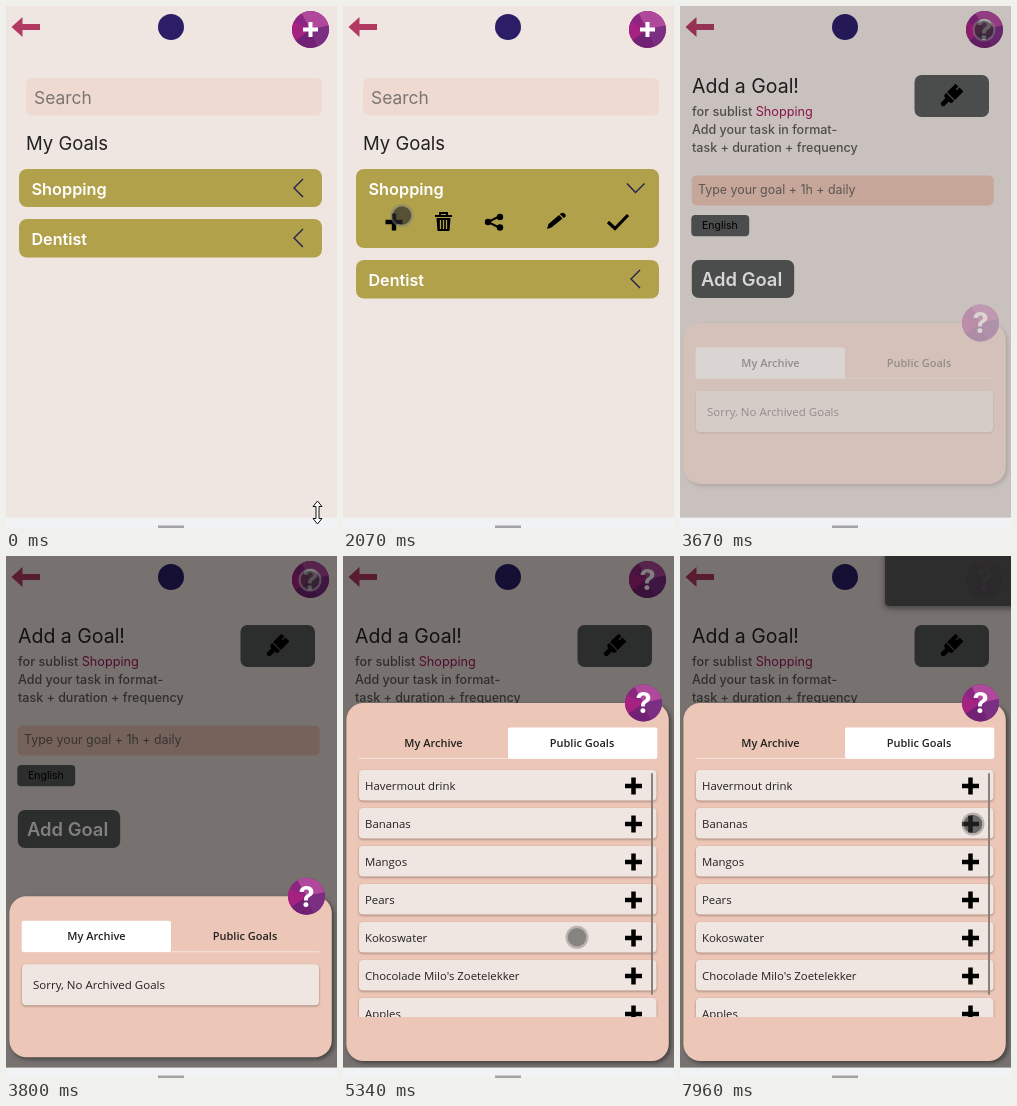
These frames come from a looping animation (331x522 px, 8 s). An HTML page:

```html
<!DOCTYPE html>
<html lang="en">
<head>
<meta charset="utf-8">
<title>Goals</title>
<style>
html, body { margin: 0; width: 100%; height: 100%; overflow: hidden; background: #efe6e1; }
svg { display: block; width: 331px; height: 522px; }
text { font-family: Inter, sans-serif; fill: #222; white-space: pre; }
.modal text { font-family: "Open Sans", sans-serif; }
.modal .tab { font-weight: 600; text-anchor: middle; }
text.mark { font-family: Inter, sans-serif; font-weight: 700; fill: #fff; text-anchor: middle; }
.line { fill: none; stroke: #22204f; stroke-width: 1.4; }
.card { fill: #b1a14a; }
.note { fill: #595b5a; }
.row { fill: #efe6e1; filter: drop-shadow(0 1.5px 1px rgba(90, 60, 50, .5)); }
</style>
</head>
<body>
<svg id="stage" viewBox="0 0 331 522"></svg>
<script>
const LOOP = 8000;
const stage = document.getElementById('stage');

const rect = (x, y, w, h, r, attr = '') =>
  `<rect x="${x}" y="${y}" width="${w}" height="${h}" rx="${r}" ${attr}/>`;
const text = (x, y, size, str, attr = '') =>
  `<text x="${x}" y="${y}" font-size="${size}" ${attr}>${str}</text>`;
const group = (id, body, attr = '') => `<g id="${id}" ${attr}>${body}</g>`;
const plus = (x, y, r, w) =>
  `<path d="M${x - r} ${y}h${2 * r}M${x} ${y - r}v${2 * r}" stroke="#000" stroke-width="${w}"/>`;

// Round faceted button centred on 0,0
const badge = `<circle r="18.5" fill="#8d2682"/>
  <path d="M0 0L-9 -16.2A18.5 18.5 0 0 1 18 -4Z" fill="#b0489b"/>
  <path d="M0 0L18 -4A18.5 18.5 0 0 1 7 17.1Z" fill="#7b2f83"/>
  <path d="M0 0L7 17.1A18.5 18.5 0 0 1 -15 10.8Z" fill="#722274"/>
  <path d="M0 0L-15 10.8A18.5 18.5 0 0 1 -17 -7.2Z" fill="#a52280"/>`;
const help = badge + text(0, 10.3, 29, '?', 'class="mark"');
const add = badge + '<path d="M-7.5 0h15M0 -7.5v15" stroke="#fff" stroke-width="4"/>';

const header = `<path d="M5.5 21L16.5 11V18H34V24H16.5V31Z" fill="#b23a62"/>
  <circle cx="165" cy="21" r="13" fill="#2b1e66"/>`;

const actions = plus(51, 216, 8.5, 4.4) +
  `<path d="M92 210h17M97 209v-2h7v2" fill="none" stroke="#000" stroke-width="2"/>
  <path d="M93.5 212h14l-1 13h-12Z"/>
  <path d="M97.5 214v9M100.5 214v9M103.5 214v9" stroke="#b1a14a" stroke-width="1.3"/>
  <path d="M157 210L145 216L157 222" fill="none" stroke="#000" stroke-width="2"/>
  <circle cx="145" cy="216" r="3.2"/><circle cx="157" cy="211" r="3.2"/><circle cx="157" cy="221.5" r="3.2"/>
  <path d="M204 223l1.5 -5L216 209l3.5 3.5L208.5 221.5Z"/>
  <path d="M216.8 208.3l2 -1.5q4 0 4 3.5l-2 1.7Z"/>
  <path d="M265 216l7 6.5L285 209" fill="none" stroke="#000" stroke-width="3.2"/>`;

const label = 'style="fill:#fff" font-weight="600"';
const home = rect(20, 72, 296, 37.5, 6, 'fill="#eedad0"') +
  text(28, 97.5, 17.4, 'Search', 'style="fill:#7a7573"') +
  text(20, 143.5, 18.5, 'My Goals') +
  rect(13, 163, 303, 38, 8, 'id="card" class="card"') +
  text(25.5, 188.5, 16.3, 'Shopping', label) +
  '<path id="closed" class="line" d="M297 173L288 182L297 191"/>' +
  group('open', '<path class="line" d="M284 177.5L292.5 186.5L301.5 177.5"/>' + actions) +
  group('next', rect(13, 213, 303, 38.5, 8, 'class="card"') +
    text(25.5, 238.5, 16.1, 'Dentist', label) +
    '<path class="line" d="M297 223L288 232L297 241"/>');

const soft = 'style="fill:#5f5b5a" font-weight="500"';
const brush = `<g transform="translate(271 90) rotate(45)">
    <path d="M-5.5 -12h4v4h1.5v-4h5.5V0h-11Z"/>
    <path d="M-5.5 1.2h11v2q0 2.3 -2.5 2.3h-.6V12q-2.4 3 -4.8 0V5.5H-3q-2.5 0 -2.5 -2.3Z"/>
  </g>`;
const form = text(12, 87, 19.5, 'Add a Goal!') +
  text(12, 110, 12.7, 'for sublist <tspan fill="#a3195b" font-weight="400">Shopping</tspan>', soft) +
  text(12, 128, 12.5, 'Add your task in format-', soft) +
  text(12, 146, 12.5, 'task + duration + frequency', soft) +
  rect(234.5, 69, 74.5, 42, 7, 'class="note"') + brush +
  rect(11.7, 169.5, 302, 30, 5, 'id="input" fill="#ecc6b6" stroke="#dd9a1c" stroke-width="1.5"') +
  text(18, 188, 12.4, 'Type your goal + 1h + daily', 'style="fill:#6e6663"') +
  rect(11.3, 209, 57.9, 21.3, 4, 'class="note"') +
  text(22, 223.2, 10.5, 'English', 'style="fill:#000"') +
  rect(11.8, 254, 102.4, 38, 7, 'class="note"') +
  text(21, 279.5, 18.4, 'Add Goal', label);

// The sheet is laid out from its own top edge at y = 0
const goals = ['Havermout drink', 'Bananas', 'Mangos', 'Pears', 'Kokoswater',
  "Chocolade Milo's Zoetelekker", 'Apples'];
const rows = goals.map((name, i) => {
  const y = 83 + 38 * i;
  return rect(16, y - 16, 297.5, 30.5, 4, 'class="row"') + text(22, y + 4, 11.4, name) + plus(290.5, y, 8.5, 4.5);
}).join('');
const modal = rect(3.4, 0, 322.4, 161, 17,
    'id="panel" fill="#ecc6b6" style="filter:drop-shadow(2px 2px 2px rgba(0,0,0,.45))"') +
  rect(16, 55, 297, 1, 0, 'fill="#f6e4dc"') +
  rect(15.7, 24.5, 149.3, 31.2, 2, 'id="tab" fill="#fff"') +
  text(90.5, 44, 11, 'My Archive', 'class="tab"') +
  text(239, 44, 11, 'Public Goals', 'class="tab"') +
  group('empty', rect(16, 68, 297, 41, 4, 'class="row"') + text(27, 93, 11.5, 'Sorry, No Archived Goals')) +
  group('list', rows + rect(308, 70, 2, 222, 1, 'fill="#8a807b"'), 'clip-path="url(#view)"') +
  `<g transform="translate(300.5 0)">${help}</g>`;

stage.innerHTML = '<defs><clipPath id="view"><path d="M0 60H331V314H0Z"/></clipPath></defs>' +
  rect(0, 0, 331, 522, 0, 'fill="#efe6e1"') + header +
  group('addIcon', add, 'transform="translate(304.5 23.5)"') +
  group('home', home) + group('form', form) +
  group('helpIcon', help, 'transform="translate(304.5 23.5)"') +
  rect(0, 0, 331, 512, 0, 'id="shade"') +
  group('modal', modal, 'class="modal"') +
  rect(205, -10, 140, 60, 4, 'id="toast" fill="#2d2d2d" fill-opacity=".93" style="filter:drop-shadow(0 2px 3px rgba(0,0,0,.5))"') +
  rect(0, 511.6, 331, 11, 0, 'fill="#f1f2f4"') + rect(152, 519.5, 26, 3, 0, 'fill="#a3a3a5"') +
  '<path id="resize" d="M311.5 495l4.5 5.5h-3v12h3l-4.5 5.5l-4.5 -5.5h3v-12h-3Z" fill="#fff" stroke="#111"/>' +
  group('dot', '<circle r="10.4" fill="none" stroke="#828282" stroke-width="2.2" stroke-opacity=".5"/><circle id="core" r="9.3" fill="#2b2b2b"/>');

const el = {};
stage.querySelectorAll('[id]').forEach(n => el[n.id] = n);
const set = (id, name, value) => el[id].setAttribute(name, value);
const show = (id, on) => el[id].style.display = on ? '' : 'none';
const ramp = (t, from, to) => Math.min(1, Math.max(0, (t - from) / (to - from)));

// Pointer stops: time, x, y
const path = [
  [70, 300, 470], [240, 215, 290], [410, 165, 174], [1130, 165, 174], [1300, 130, 186],
  [1530, 59, 209.5], [2460, 59, 209.5], [2810, 222, 147], [3320, 304, 24], [4080, 304, 24],
  [4350, 259.5, 285.5], [4680, 236, 382], [5270, 234, 381.5], [5340, 234, 381.5], [5740, 226, 291],
  [6140, 202, 416], [6280, 198, 428], [6420, 198, 428], [7220, 268, 263], [7500, 293, 268], [LOOP, 293, 268]
];
const taps = [740, 1670, 2070, 3540, 4880, 7890];

function pointer(t) {
  const i = Math.max(1, path.findIndex(p => p[0] >= t));
  const [a, b] = [path[i - 1], path[i]];
  const k = ramp(t, a[0], b[0]);
  return [a[1] + (b[1] - a[1]) * k, a[2] + (b[2] - a[2]) * k];
}

function draw(t) {
  const opened = t >= 800, adding = t >= 2130, publicTab = t >= 4940, full = t >= 5010;
  show('home', !adding);
  show('addIcon', !adding);
  show('form', adding);
  show('helpIcon', adding);
  show('open', opened);
  show('closed', !opened);
  set('card', 'height', opened ? 79 : 38);
  set('next', 'transform', `translate(0 ${opened ? 41 : 0})`);
  set('input', 'stroke-opacity', t < 3540 ? 1 : 0);

  const fade = ramp(t, 3610, 3800);
  const slide = 1 - (1 - ramp(t, 3610, 3940)) ** 3;
  set('shade', 'opacity', fade / 2);
  set('modal', 'opacity', fade);
  set('modal', 'transform', `translate(0 ${full ? 147 : 344 - 50 * (1 - slide)})`);
  set('panel', 'height', full ? 358 : 161);
  set('tab', 'x', publicTab ? 165 : 15.7);
  show('empty', !publicTab);
  show('list', full);
  show('toast', t >= 7950);

  const [x, y] = pointer(t);
  show('resize', t < 70);
  show('dot', t >= 70);
  set('dot', 'transform', `translate(${x} ${y})`);
  set('core', 'fill-opacity', taps.some(p => t >= p && t < p + 135) ? .68 : .53);
}

const start = performance.now();
function tick() {
  draw((performance.now() - start) % LOOP);
  requestAnimationFrame(tick);
}
tick();
</script>
</body>
</html>
```
